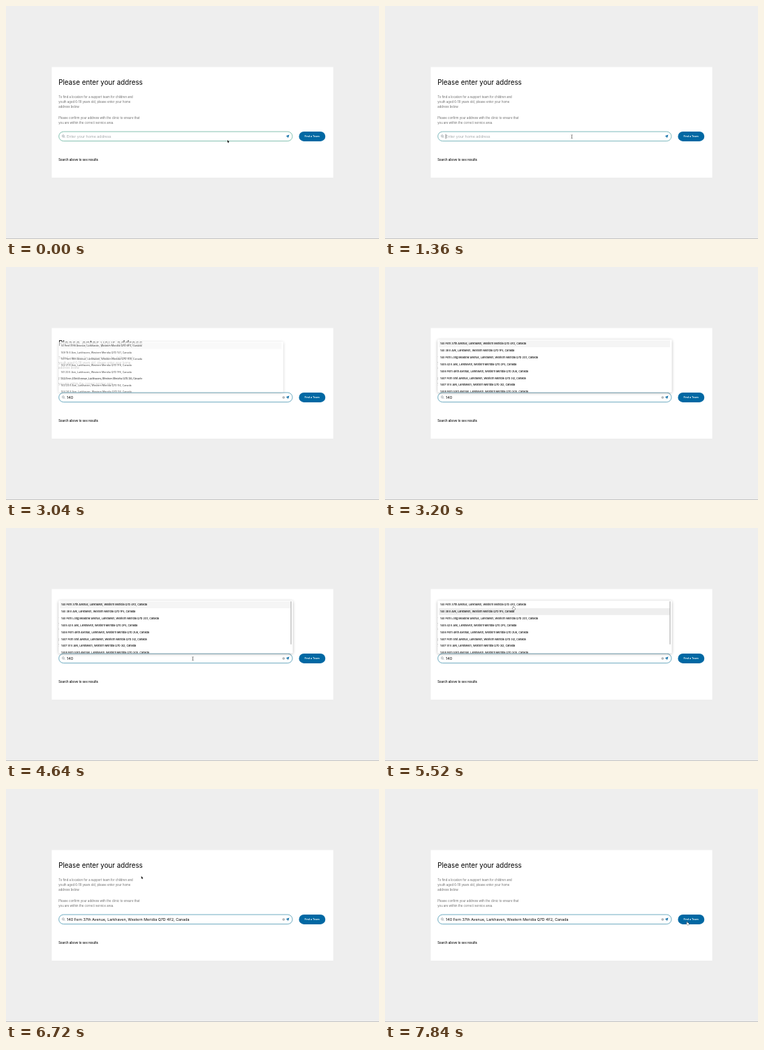
Write an HTML page with a canvas that moves like this. It is 534x334 px and loops after 8 s.

```html
<!DOCTYPE html>
<html lang="en">
<head>
<meta charset="utf-8">
<title>Address search</title>
<style>
  html, body { margin: 0; width: 100%; height: 100%; overflow: hidden; background: #eee; }
  canvas { display: block; width: 100vw; height: 100vh; }
</style>
</head>
<body>
<canvas id="stage"></canvas>
<script>
const W = 534, H = 334, LOOP = 8000, STEP = 80;
const canvas = document.getElementById('stage');
const ctx = canvas.getContext('2d');
const FONT = 'Inter, "Open Sans", sans-serif';
const BLUE = '#0068a3';
const PANEL = { x: 75.5, y: 104.2, w: 335, h: 75.4, row: 9.83 };

const TOWN = ', Larkhaven, Western Meridia ';
const address = (street, code) => street + TOWN + code + ', Canada';

const RESULTS = [
  ['140 Fern 37th Avenue', 'Q7D 4F2'],
  ['140 38 E Ave', 'Q7D 1F5'],
  ['140 Fern Long Meadow Avenue', 'Q7D 2O1'],
  ['1405 42 E Ave', 'Q7D 2F5'],
  ['1406 Fern 49th Avenue', 'Q7D 2U6'],
  ['1407 Fern 51st Avenue', 'Q7D 3I2'],
  ['1407 51 E Ave', 'Q7D 3I2'],
  ['1408 Fern 53rd Avenue', 'Q7D 3O5']
].map(r => address(...r));

const EARLY = [
  ['14 Fern 37th Avenue', 'Q7D 4F2'],
  ['149 15 E Ave', 'Q7D 1U1'],
  ['141 Fern 18th Avenue', 'Q7D 1O5'],
  ['142 21 E Ave', 'Q7D 1F6'],
  ['141 22 E Ave', 'Q7D 1F6'],
  ['143 Fern 23rd Avenue', 'Q7D 1I4'],
  ['143 23 E Ave', 'Q7D 1I4'],
  ['144 24 E Ave', 'Q7D 1I4']
].map(r => address(...r));

// time, x, y of the pointer tip, pointer shape from here on
const PATH = [
  [0, 317, 192, 'arrow'],
  [80, 309.5, 191, 'beam'],
  [320, 267.5, 187, 'beam'],
  [2400, 267.5, 187, 'none'],
  [4640, 267.5, 187, 'beam'],
  [4720, 259, 177, 'hand'],
  [5040, 184, 146, 'hand'],
  [5280, 172, 119, 'hand'],
  [5520, 183.3, 112.6, 'hand'],
  [6480, 184.3, 111.8, 'hand'],
  [6640, 184.3, 111.8, 'arrow'],
  [6960, 222, 164, 'arrow'],
  [7120, 270, 184, 'beam'],
  [7360, 385, 188, 'beam'],
  [7440, 414, 189, 'arrow'],
  [7520, 424, 189, 'hand'],
  [7600, 432.2, 189.5, 'hand'],
  [7840, 432.2, 190.2, 'hand']
];

const clamp = v => Math.max(0, Math.min(1, v));
const span = (t, a, b) => clamp((t - a) / (b - a));
const mix = (a, b, k) => a + (b - a) * k;
const mixColor = (a, b, k) => `rgb(${a.map((v, i) => Math.round(mix(v, b[i], k)))})`;

// Laid out at ten times the size so that small text keeps exact advances.
function text(str, x, y, size, color, weight = 400) {
  ctx.save();
  ctx.translate(x, y);
  ctx.scale(0.1, 0.1);
  ctx.font = `${weight} ${size * 10}px ${FONT}`;
  ctx.fillStyle = color;
  ctx.fillText(str, 0, 0);
  ctx.restore();
}

function box(x, y, w, h, r, color) {
  ctx.beginPath();
  ctx.roundRect(x, y, w, h, r);
  ctx.fillStyle = color;
  ctx.fill();
}

function poly(points, fill, stroke, width) {
  ctx.beginPath();
  points.forEach(([x, y]) => ctx.lineTo(x, y));
  ctx.closePath();
  if (stroke) {
    ctx.lineJoin = 'round';
    ctx.lineWidth = width;
    ctx.strokeStyle = stroke;
    ctx.stroke();
  }
  ctx.fillStyle = fill;
  ctx.fill();
}

function page() {
  box(0, 0, W, H, 0, '#eeeeee');
  box(0, 333, W, 1, 0, '#c4c4c4');
  box(65.5, 87.6, 403, 158.4, 0, '#ffffff');
  text('Please enter your address', 75.2, 113.4, 9.77, '#000000');
  const lines = [
    ['To find a location for a support team for children and', 131.7],
    ['youth aged 6-18 years old, please enter your home', 138.7],
    ['address below.', 145.7],
    ['Please confirm your address with the clinic to ensure that', 161.7],
    ['you are within the correct service area.', 168.7]
  ];
  lines.forEach(([str, y]) => text(str, 75.3, y, 4.28, '#686868'));
  text('Search above to see results', 75.3, 222, 4.28, '#000000', 500);
}

function typed(t) {
  if (t >= 6400) return RESULTS[0];
  return '140'.slice(0, Math.max(0, Math.floor((t - 2400) / 80) + 1));
}

function field(t) {
  const hover = span(t, 160, 320), focus = span(t, 1440, 2080);
  if (focus > 0) {
    ctx.globalAlpha = focus;
    box(75.1, 179.5, 335.5, 14.7, 7.35, '#e3eff5');
    ctx.globalAlpha = 1;
  }
  ctx.beginPath();
  ctx.roundRect(75.7, 180.1, 334.3, 13.5, 6.75);
  ctx.fillStyle = '#fff';
  ctx.fill();
  ctx.lineWidth = 0.7;
  ctx.strokeStyle = mixColor([82, 170, 145], [66, 146, 174], mix(hover * 0.6, 1, focus));
  ctx.stroke();

  ctx.strokeStyle = '#6c7880';
  ctx.lineWidth = 0.6;
  ctx.beginPath();
  ctx.arc(81.9, 186.4, 1.45, 0, Math.PI * 2);
  ctx.moveTo(83, 187.5);
  ctx.lineTo(84.3, 188.8);
  ctx.stroke();

  const value = typed(t);
  if (value) text(value, 87, 188.9, 5.37, '#000000');
  else text('Enter your home address', 87, 188.9, 5.37, '#a2a6a9');
  if (t >= 1360 && t < 1840) box(86.8, 183.4, 0.5, 7, 0, '#222');

  if (t >= 2720) {
    ctx.beginPath();
    ctx.arc(397.4, 187, 1.8, 0, Math.PI * 2);
    ctx.fillStyle = '#a3a8ab';
    ctx.fill();
    ctx.strokeStyle = '#fff';
    ctx.lineWidth = 0.4;
    ctx.beginPath();
    ctx.moveTo(396.7, 186.3); ctx.lineTo(398.1, 187.7);
    ctx.moveTo(398.1, 186.3); ctx.lineTo(396.7, 187.7);
    ctx.stroke();
  }
  poly([[405.5, 184.5], [403.8, 189.4], [402.9, 187.2], [400.7, 186.4]], BLUE);
}

function button() {
  box(419.4, 180, 37.8, 13.9, 6.95, BLUE);
  text('Find a Team', 427.4, 188.2, 3.68, '#ffffff', 600);
}

function hotRow(t) {
  if (t >= 5760 || t < 4720) return 0;
  return Math.max(1, Math.min(7, Math.floor((pointer(t).y - 105) / PANEL.row)));
}

// Drawn only outside the panel, so that a faded panel stays white.
function panelShadow() {
  const { x, y, w, h } = PANEL;
  const dpr = canvas.width / W;
  ctx.save();
  ctx.beginPath();
  ctx.rect(x - 20, y - 20, w + 40, h + 40);
  ctx.rect(x, y, w, h);
  ctx.clip('evenodd');
  ctx.shadowColor = 'rgba(0,0,0,0.3)';
  ctx.shadowBlur = 4 * dpr;
  ctx.shadowOffsetY = 0.8 * dpr;
  box(x, y, w, h, 1.5, '#ffffff');
  ctx.restore();
}

function dropdown(t) {
  if (t < 2880 || t >= 6720) return;
  const { x, y, w, h, row } = PANEL;
  const enter = span(t, 2880, 3140), leave = span(t, 6400, 6720) ** 3;
  const scale = mix(0.75, 1, Math.min(1 - (1 - enter) ** 2 * 1.1, 1 - leave));
  ctx.save();
  ctx.translate(x, y + h);
  ctx.scale(scale, scale);
  ctx.translate(-x, -y - h);
  ctx.globalAlpha = Math.min(enter, 1 - leave);

  panelShadow();
  ctx.beginPath();
  ctx.rect(x, y, w, h);
  ctx.clip();
  box(x, y, w, h, 1.5, '#ffffff');
  box(77.2, 105.2 + hotRow(t) * row, 330.8, 9.7, 0, t < 4720 ? '#f5f5f5' : '#eeeeee');
  const rows = t < 3120 ? EARLY : RESULTS;
  rows.forEach((str, i) => text(str, 79, 111.4 + i * row, 3.72, '#000000', 450));
  if (t >= 4640) box(407.4, 105, 1.3, 62, 0.65, '#b9b9b9');
  ctx.restore();
}

function pointer(t) {
  let i = PATH.length - 1;
  while (PATH[i][0] > t) i--;
  const a = PATH[i], b = PATH[i + 1] || a;
  const k = a === b ? 0 : span(t, a[0], b[0]);
  return { x: mix(a[1], b[1], k), y: mix(a[2], b[2], k), kind: a[3] };
}

function drawPointer(t) {
  const { x, y, kind } = pointer(t);
  ctx.save();
  ctx.translate(x, y);
  if (kind === 'arrow') {
    poly([[0, 0], [0, 3.9], [0.9, 3.1], [1.5, 4.4], [2.1, 4.1], [1.5, 2.9], [2.7, 2.8]],
      '#111', '#fff', 0.7);
  } else if (kind === 'beam') {
    ctx.strokeStyle = '#333';
    ctx.lineWidth = 0.6;
    ctx.beginPath();
    ctx.moveTo(-1, -2.4); ctx.lineTo(0, -1.9); ctx.lineTo(1, -2.4);
    ctx.moveTo(0, -1.9); ctx.lineTo(0, 2.5);
    ctx.moveTo(-1, 3); ctx.lineTo(0, 2.5); ctx.lineTo(1, 3);
    ctx.stroke();
  } else if (kind === 'hand') {
    poly([[0, 0], [0.7, 0], [0.8, 1.6], [2.5, 2], [2.9, 2.5], [2.5, 4.6], [0.5, 4.6],
      [-0.9, 2.8], [-0.6, 2.4], [0, 2.9]], '#fff', '#222', 0.75);
  }
  ctx.restore();
}

function resize() {
  const dpr = window.devicePixelRatio || 1;
  const w = Math.round(W * dpr), h = Math.round(H * dpr);
  if (canvas.width !== w || canvas.height !== h) {
    canvas.width = w;
    canvas.height = h;
  }
  ctx.setTransform(w / W, 0, 0, h / H, 0, 0);
}

function draw(t) {
  resize();
  page();
  field(t);
  button();
  dropdown(t);
  drawPointer(t);
}

const start = performance.now();
function tick() {
  const t = (performance.now() - start) % LOOP;
  draw(Math.floor(t / STEP) * STEP);
  requestAnimationFrame(tick);
}
tick();
</script>
</body>
</html>
```
